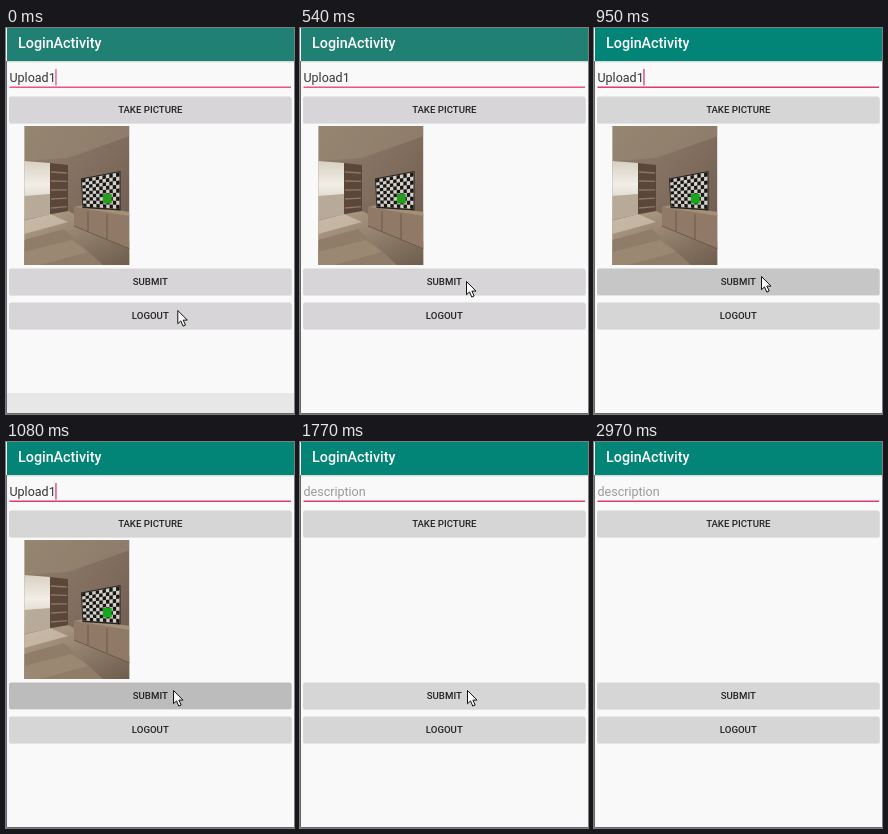
An HTML page for the animation above (3230 ms loop, 288 px wide and 386 px high).

```html
<!DOCTYPE html>
<html lang="en">
<head>
<meta charset="utf-8">
<title>Upload form</title>
<style>
  html, body { margin: 0; width: 100%; height: 100%; overflow: hidden; background: #f9f9f9; }
  svg { display: block; width: 100vw; height: 100vh; font-family: Roboto, sans-serif; }
  .label { font-size: 9.65px; font-weight: 500; fill: #222; text-anchor: middle; }
  .field { font-size: 12.5px; }
</style>
</head>
<body>
<svg viewBox="0 0 288 386" preserveAspectRatio="none">
  <defs>
    <linearGradient id="wall" x1="0" y1="0" x2="1" y2="1">
      <stop offset="0" stop-color="#91816f"/>
      <stop offset=".5" stop-color="#806d5d"/>
      <stop offset="1" stop-color="#69574c"/>
    </linearGradient>
    <linearGradient id="window" x1="0" y1="0" x2="0" y2="1">
      <stop offset="0" stop-color="#d8d0c2"/>
      <stop offset=".4" stop-color="#f1eee7"/>
      <stop offset="1" stop-color="#c5b9a8"/>
    </linearGradient>
    <linearGradient id="floor" x1="0" y1="0" x2="1" y2="1">
      <stop offset="0" stop-color="#b5a38d"/>
      <stop offset="1" stop-color="#6d5b4c"/>
    </linearGradient>
    <clipPath id="crop"><rect x="18.5" y="98" width="104.7" height="139"/></clipPath>
  </defs>

  <rect width="288" height="386" fill="#f9f9f9"/>
  <rect x="1" y="33" width="287" height="1" fill="#d5dedc"/>
  <rect x="1" y="34" width="287" height="1" fill="#eceeee"/>
  <rect id="header" x="1" width="287" height="33"/>
  <text x="12" y="20" font-size="14.3" font-weight="500" fill="#fff">LoginActivity</text>

  <text id="text" class="field" x="3.5" y="54"></text>
  <rect id="line" x="3.5" y="58.5" width="281.5" height="1.5"/>
  <rect id="caret" y="41" width="1.3" height="16.5"/>

  <g id="buttons"></g>

  <g id="photo" clip-path="url(#crop)">
    <rect x="18" y="98" width="106" height="140" fill="url(#wall)"/>
    <path d="M18 98H124V108L62 130L18 133Z" fill="#9a8a76" opacity=".55"/>
    <path d="M18 133L44 135V186L18 192Z" fill="url(#window)"/>
    <path d="M18 168L44 166V186L18 192Z" fill="#b7aa98"/>
    <path d="M18 192L62 183L124 214V238H18Z" fill="url(#floor)"/>
    <path d="M18 193L44 186L62 194L18 206Z" fill="#d2c5b2" opacity=".7"/>
    <path d="M18 212L58 201L98 238H18Z" fill="#8f7d6a"/>
    <path d="M18 224L66 212L82 224L30 238H18Z" fill="#a49079" opacity=".6"/>
    <path d="M44 135L62 137V183L44 186Z" fill="#5a473a"/>
    <path id="shelves" fill="none" stroke="#8c7762" stroke-width="1.3"/>
    <path d="M68 179L124 187V221L68 198Z" fill="#907a67"/>
    <path d="M68 179L77 177L124 184V188Z" fill="#a48f79"/>
    <path d="M82 183V203M101 186V211M68 198L124 221" fill="none" stroke="#64513f" stroke-width=".8"/>
    <path d="M75 150.5L114.5 143V182.5L76.5 180Z" fill="#26231f"/>
    <path d="M76 151.5L113.5 144.3V181L77.3 178.5Z" fill="#d3d0ca"/>
    <path id="checks" fill="#171614"/>
    <rect id="marker" x="97" y="166" width="8.7" height="9.5"/>
  </g>

  <rect id="bar" x="1" width="287" fill="#e7e7e7"/>
  <path d="M.5 33V385.5H288" fill="none" stroke="#666"/>
  <path id="mouse" d="M0 0V13.2L3 10.4L5.3 15.6L7.7 14.5L5.4 9.6H9.5Z"
        fill="#fff" stroke="#111" stroke-linejoin="round"/>
</svg>
<script>
const $ = id => document.getElementById(id);
const set = (id, attrs) => {
  for (const key in attrs) $(id).setAttribute(key, attrs[key]);
};
const show = (id, on) => set(id, { visibility: on ? 'visible' : 'hidden' });

$('buttons').innerHTML = [['TAKE PICTURE', 69], ['SUBMIT', 241], ['LOGOUT', 275]].map(([label, y]) =>
  `<rect x="3" y="${y + 1}" width="283" height="26" rx="2" fill="#e3e3e3"/>
   <rect class="face" x="3" y="${y - .5}" width="282.5" height="26.5" rx="2"/>
   <text class="label" x="144.3" y="${y + 16.4}">${label}</text>`).join('');
const faces = document.querySelectorAll('.face');

set('shelves', { d: Array.from({ length: 5 }, (_, i) => `M45 ${144 + i * 9}L61 ${145 + i * 8.4}`).join('') });

// Checkerboard laid out in perspective on the screen
const COLS = 11, ROWS = 9;
const lerp = (a, b, t) => a + (b - a) * t;
const corner = (c, r) => {
  const u = c / COLS, v = r / ROWS;
  return `${lerp(76, 113.5, u) + (1 - u) * v * 1.3} ${lerp(lerp(151.5, 144.3, u), lerp(178.5, 181, u), v)}`;
};
let checks = '';
for (let r = 0; r < ROWS; r++)
  for (let c = r % 2; c < COLS; c += 2)
    checks += `M${corner(c, r)}L${corner(c + 1, r)}L${corner(c + 1, r + 1)}L${corner(c, r + 1)}Z`;
set('checks', { d: checks });

const LOOP = 3230;
// Each track: [start ms, value]
const tracks = {
  mouse: [[0, [171.8, 282.5]], [130, [169, 266]], [270, [166.5, 253.5]], [690, [167.5, 248.5]],
          [2160, [176, 229]], [2280, [188, 207]], [2420, [192.5, 196.5]], [2550, [181, 218]],
          [2690, [175, 222]], [2820, null]],
  caret: [[0, true], [420, false], [950, true], [1770, false], [2280, true], [2820, false]],
  bar: [[0, 365], [130, 382], [270, 386]],
  muted: [[0, true], [690, false]],
  submit: [[0, null], [950, '#c6c6c6'], [1080, '#bcbcbc'], [1220, '#c9c9c9'], [1350, null]],
  sent: [[0, false], [1220, true]]
};
const at = (track, t) => track.findLast(([start]) => start <= t)[1];

function draw(now) {
  const t = now % LOOP, s = {};
  for (const key in tracks) s[key] = at(tracks[key], t);

  const accent = s.muted ? '#ea5384' : '#dd3b70';
  const face = s.muted ? '#d7d5d7' : '#d6d6d6';
  set('header', { fill: s.muted ? '#208073' : '#028576' });
  set('line', { fill: accent });
  set('caret', { fill: accent, x: s.sent ? 3.5 : 49.3 });
  show('caret', s.caret);
  set('text', { fill: s.sent ? '#999' : '#333' });
  $('text').textContent = s.sent ? 'description' : 'Upload1';
  faces.forEach((el, i) => el.setAttribute('fill', i === 1 && s.submit || face));
  show('photo', !s.sent);
  set('marker', { fill: s.muted ? '#259d1d' : '#16a81a' });
  set('bar', { y: s.bar, height: 386 - s.bar });
  show('mouse', s.mouse);
  if (s.mouse) set('mouse', { transform: `translate(${s.mouse})` });
}

const origin = performance.now();
function tick() {
  draw(performance.now() - origin);
  requestAnimationFrame(tick);
}
tick();
</script>
</body>
</html>
```
